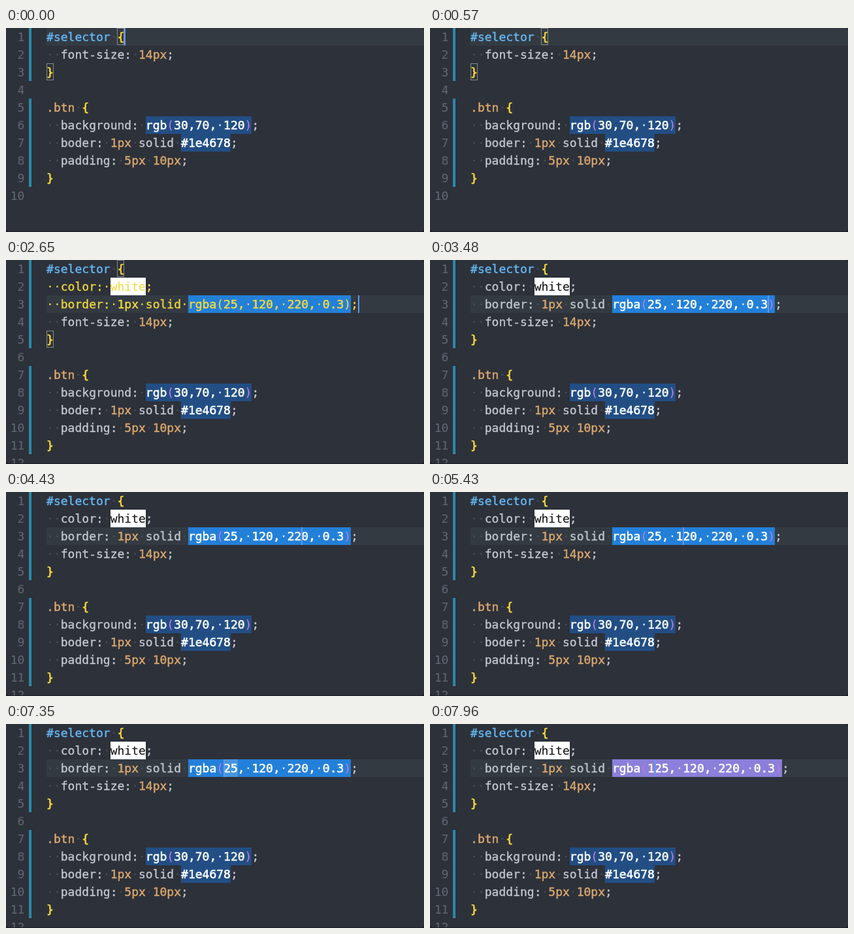
These frames come from a looping animation (640x312 px, 8 s). An HTML page:

```html
<!DOCTYPE html>
<html lang="en">
<head>
<meta charset="utf-8">
<title>Editor colour preview</title>
<style>
html, body { margin: 0; width: 100%; height: 100%; overflow: hidden; background: #1c2026; }
#editor {
  position: relative; width: 640px; height: 311px; overflow: hidden;
  border-radius: 0 4px 5px 5px; background: #2d313a; color: #c3c8d1;
  font: 18px/27px "DejaVu Sans Mono", monospace; white-space: pre;
  -webkit-text-stroke: .35px;
}
#editor > *, .row > * { position: absolute; }
.row { left: 0; height: 27px; }
.num { left: 0; width: 28.4px; text-align: right; color: #5f6671; -webkit-text-stroke: .1px; }
.code { left: 62.1px; }
.bar { left: 35px; width: 4px; background: #2a89a8; }
.line { left: 62px; right: 0; height: 27px; background: #333a42; }
.id { color: #62b3ee; }
.class, .value { color: #d8a66d; }
.id, .class, .value { -webkit-text-stroke: .5px; }
.brace { color: #f8d83a; -webkit-text-stroke: .7px; }
.space { color: #484e59; -webkit-text-stroke: 0; }
.chip { display: inline-block; height: 27px; vertical-align: top; color: #fff; -webkit-text-stroke: .6px; }
.chip .space { color: #e6edf8; }
.chip .paren { color: #b87be0; -webkit-text-stroke: .2px; }
.chip.plain { color: #111; -webkit-text-stroke: .1px; }
.fresh, .fresh * { color: #f0d840 !important; }
.match { box-sizing: border-box; width: 11px; height: 26px; border: 1px solid #898b82; }
.word { height: 27px; background: rgba(255, 255, 255, .16); }
.cursor { width: 2px; height: 27px; background: #6697ec; }
</style>
</head>
<body>
<div id="editor"></div>
<script>
const LOOP = 8000, ROW = 27, LEFT = 62.1, CHAR = 10.836;
const PASTE = 2520, SETTLE = 2860, LEFT_KEY = 3095, KEY_GAP = 162.5;
const WORD = 6430, TYPE = 7520, RECOLOR = 7620;
const editor = document.getElementById("editor");
const column = n => LEFT + n * CHAR;

const button = [
  "", ".btn {", "  background: rgb(30,70, 120);", "  boder: 1px solid #1e4678;",
  "  padding: 5px 10px;", "}", ""
];
const pattern = /(?<id>#selector)|(?<class>\.btn)|(?<brace>[{}])|(?<chip>rgba?\(.*?\)|#1e4678|white)|(?<value>\d+px)|(?<space> )/g;
const span = (cls, text, style = "") => `<span class="${cls}" style="${style}">${text}</span>`;
const box = (cls, style) => `<div class="${cls}" style="${style}"></div>`;

function chip(text, accent) {
  const plain = text === "white";
  const color = plain ? "#fff" : text.startsWith("rgba") ? accent : "#224e84";
  const inner = text.replace(/[()]| /g, c => c === " " ? span("space", "·") : span("paren", c));
  return span(plain ? "chip plain" : "chip", inner, `background:${color}`);
}

function highlight(text, accent) {
  return text.replace(pattern, (token, ...rest) => {
    const groups = rest[rest.length - 1];
    const type = Object.keys(groups).find(key => groups[key] !== undefined);
    if (type === "chip") return chip(token, accent);
    return span(type, type === "space" ? "·" : token);
  });
}

function cursorAt(t) {
  if (t < PASTE) return { row: 0, col: 11, since: -300 };
  if (t >= TYPE) return { row: 2, col: 26, since: TYPE };
  const moves = Math.min(19, Math.max(0, Math.floor((t - LEFT_KEY) / KEY_GAP)));
  return { row: 2, col: 44 - moves, since: moves ? LEFT_KEY + moves * KEY_GAP : PASTE };
}

function view(t) {
  const pasted = t >= PASTE;
  const red = t >= TYPE ? 125 : 25;
  const accent = t >= RECOLOR ? "#8a7fda" : "#2380d9";
  const added = pasted ? ["  color: white;", `  border: 1px solid rgba(${red}, 120, 220, 0.3);`] : [];
  const lines = ["#selector {", ...added, "  font-size: 14px;", "}", ...button];
  if (pasted) lines.push("");
  const shift = added.length;
  const cursor = cursorAt(t);
  const bar = (from, count) => box("bar", `top:${from * ROW}px;height:${count * ROW}px`);

  let html = box("line", `top:${cursor.row * ROW}px`) + bar(0, 3 + shift) + bar(4 + shift, 5);
  lines.forEach((text, i) => {
    const fresh = pasted && t < SETTLE && (i === 1 || i === 2);
    html += `<div class="row" style="top:${i * ROW}px">${span("num", i + 1)}` +
      `${span(fresh ? "code fresh" : "code", highlight(text, accent))}</div>`;
  });
  if (t < SETTLE) {
    html += box("match", `left:${column(10)}px;top:0`) +
      box("match", `left:${column(0)}px;top:${(2 + shift) * ROW}px`);
  }
  if (t >= WORD && t < TYPE) {
    html += box("word", `left:${column(25)}px;top:${2 * ROW}px;width:${2 * CHAR}px`);
  }
  if (Math.floor((t - cursor.since) / 500) % 2 === 0) {
    html += box("cursor", `left:${column(cursor.col)}px;top:${cursor.row * ROW}px`);
  }
  return html;
}

let shown = "";
function tick() {
  const html = view(performance.now() % LOOP);
  if (html !== shown) editor.innerHTML = shown = html;
  requestAnimationFrame(tick);
}
tick();
</script>
</body>
</html>
```
